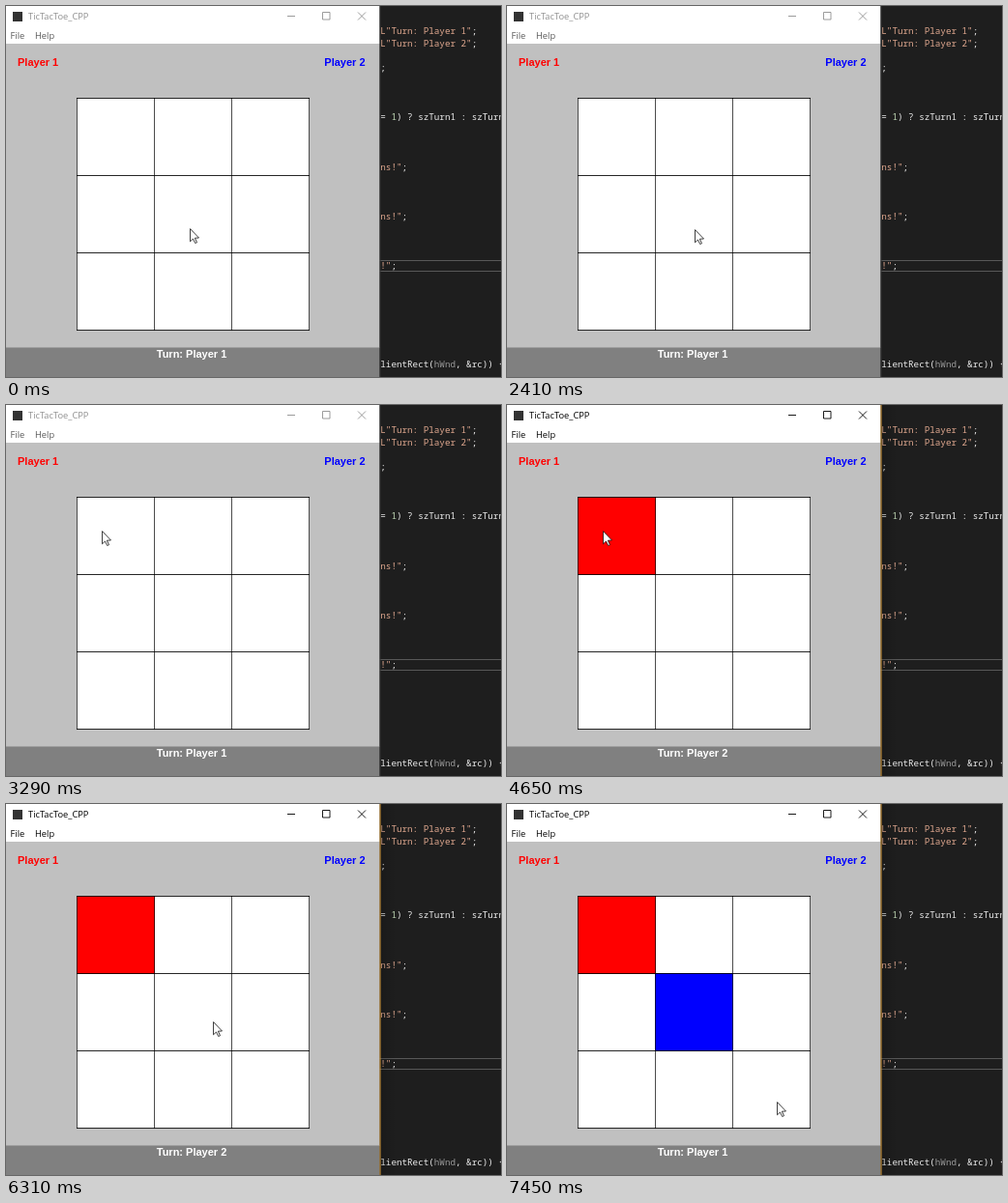
Write an HTML page with a canvas that moves like this. It is 512 by 384 pixels and loops after 8 s.

```html
<!DOCTYPE html>
<html lang="en">
<head>
<meta charset="utf-8">
<title>Tic-tac-toe</title>
<style>
html, body { margin: 0; width: 100%; height: 100%; overflow: hidden; background: #1e1e1e; }
canvas { display: block; }
</style>
</head>
<body>
<canvas id="stage" width="512" height="384"></canvas>
<script>
const ctx = document.getElementById('stage').getContext('2d');
const LOOP = 8000, STEP = 120;
const RED_MOVE = 4650, BLUE_MOVE = 6840;
const WINDOW_W = 386.5, CELL = 80, BOARD_X = 73, BOARD_Y = 95;

const UI = '9.3px "Open Sans", "Noto Sans", sans-serif';
const BOLD = 'bold 11px "Liberation Sans", Arial, sans-serif';
const MONO = '9.25px "Noto Sans Mono", "DejaVu Sans Mono", monospace';

const STRING = '#e0a88f', PLAIN = '#ececec', NUMBER = '#c0d8b4', PARAM = '#9a9a9a';

// Visible ends of the editor lines: row, then [text, colour] runs.
const CODE = [
  [0, ['L"Turn: Player 1"', STRING], [';', PLAIN]],
  [1, ['L"Turn: Player 2"', STRING], [';', PLAIN]],
  [3, [';', PLAIN]],
  [7, ['= ', PLAIN], ['1', NUMBER], [') ? szTurn1 : szTurn2', PLAIN]],
  [11, ['ns!"', STRING], [';', PLAIN]],
  [15, ['ns!"', STRING], [';', PLAIN]],
  [19, ['!"', STRING], [';', PLAIN]],
  [27, ['lientRect(', PLAIN], ['hWnd', PARAM], [', &rc)) {', PLAIN]],
];

// Each glide advances one step per STEP ms; "bend" is an optional curve control point.
const HOME = [190, 230];
const GLIDES = [
  { at: 370, steps: 1, to: [190, 229] },
  { at: 2410, steps: 2, to: [190, 217], bend: [198, 239] },
  { at: 2680, steps: 4, to: [97, 129] },
  { at: 3290, steps: 1, to: [99, 130] },
  { at: 5150, steps: 4, to: [222, 215] },
  { at: 5830, steps: 5, to: [214, 225], bend: [231, 175] },
  { at: 7090, steps: 4, to: [279, 308] },
];

const smooth = p => p * p * (3 - 2 * p);

function pointerAt(t) {
  let pos = HOME;
  for (const { at, steps, to, bend } of GLIDES) {
    if (t < at) break;
    const done = Math.min(steps, Math.floor((t - at + 10) / STEP) + 1);
    const p = smooth(done / steps), q = 1 - p;
    pos = pos.map((from, i) => {
      const mid = bend ? bend[i] : (from + to[i]) / 2;
      return Math.round(q * q * from + 2 * q * p * mid + p * p * to[i]);
    });
  }
  return pos;
}

function rect(x, y, w, h, color) {
  ctx.fillStyle = color;
  ctx.fillRect(x, y, w, h);
}

function label(text, x, y, font, color, align = 'left') {
  ctx.font = font;
  ctx.fillStyle = color;
  ctx.textAlign = align;
  ctx.fillText(text, x, y);
}

function drawEditor() {
  rect(0, 0, 512, 384, '#1e1e1e');
  for (const y of [263, 274]) rect(WINDOW_W, y, 126, 1, '#585858');
  for (const [row, ...runs] of CODE) {
    let x = 387.3;
    for (const [text, color] of runs) {
      label(text, x, Math.round(28.7 + row * 12.8), MONO, color);
      x += ctx.measureText(text).width;
    }
  }
}

function drawWindowEdge(active) {
  if (active) {
    const shade = ctx.createLinearGradient(WINDOW_W, 0, 404, 0);
    shade.addColorStop(0, 'rgba(0,0,0,.15)');
    shade.addColorStop(1, 'rgba(0,0,0,0)');
    rect(WINDOW_W, 0, 17, 384, shade);
  }
  rect(WINDOW_W, 0, 1, 384, active ? '#d69a3a' : '#333');
}

function drawTitleBar(active) {
  const ink = active ? '#000' : '#909090';
  const menuInk = active ? '#000' : '#585858';
  rect(0, 0, WINDOW_W, 39, '#fff');
  rect(7, 6, 10, 10, '#333');
  label('TicTacToe_CPP', 23, 14.3, UI, ink);
  label('File', 4.5, 34.3, UI, menuInk);
  label('Help', 30, 34.3, UI, menuInk);

  ctx.strokeStyle = ink;
  ctx.lineWidth = 0.9;
  ctx.beginPath();
  ctx.moveTo(291, 10.5);
  ctx.lineTo(299, 10.5);
  ctx.rect(327.5, 6.5, 7.5, 7.5);
  ctx.moveTo(364, 6.5);
  ctx.lineTo(372, 14.5);
  ctx.moveTo(372, 6.5);
  ctx.lineTo(364, 14.5);
  ctx.stroke();
}

function fillCell(col, row, color) {
  rect(BOARD_X + col * CELL, BOARD_Y + row * CELL, CELL + 1, CELL + 1, color);
}

function drawBoard(t) {
  const size = 3 * CELL + 1;
  rect(BOARD_X, BOARD_Y, size, size, '#fff');
  if (t >= RED_MOVE) fillCell(0, 0, '#f00');
  if (t >= BLUE_MOVE) fillCell(1, 1, '#00f');
  for (let i = 0; i < 4; i++) {
    rect(BOARD_X + i * CELL, BOARD_Y, 1, size, 'rgba(0,0,0,.7)');
    rect(BOARD_X, BOARD_Y + i * CELL, size, 1, 'rgba(0,0,0,.85)');
  }
}

function drawPointer(t) {
  const [x, y] = pointerAt(t);
  const outline = [[0, 0], [0, 13.2], [3, 10.4], [5.2, 14.9], [7, 14.1], [4.9, 9.6], [9, 9.4]];
  ctx.beginPath();
  for (const [dx, dy] of outline) ctx.lineTo(x + 0.5 + dx, y + 0.6 + dy);
  ctx.closePath();
  ctx.fillStyle = '#fff';
  ctx.fill();
  ctx.strokeStyle = '#111';
  ctx.lineWidth = 0.8;
  ctx.stroke();
}

function draw(t) {
  const active = t >= RED_MOVE;
  const player = active && t < BLUE_MOVE ? 2 : 1;
  drawEditor();
  drawTitleBar(active);
  rect(0, 39, WINDOW_W, 315, '#c0c0c0');
  rect(0, 353.5, WINDOW_W, 31, '#808080');
  drawWindowEdge(active);
  label('Player 1', 12, 62, BOLD, '#f00');
  label('Player 2', 371.5, 62, BOLD, '#00f', 'right');
  label('Turn: Player ' + player, 192, 364, BOLD, '#fff', 'center');
  drawBoard(t);
  drawPointer(t);
}

const start = performance.now();
function tick() {
  draw((performance.now() - start) % LOOP);
  requestAnimationFrame(tick);
}
tick();
</script>
</body>
</html>
```
